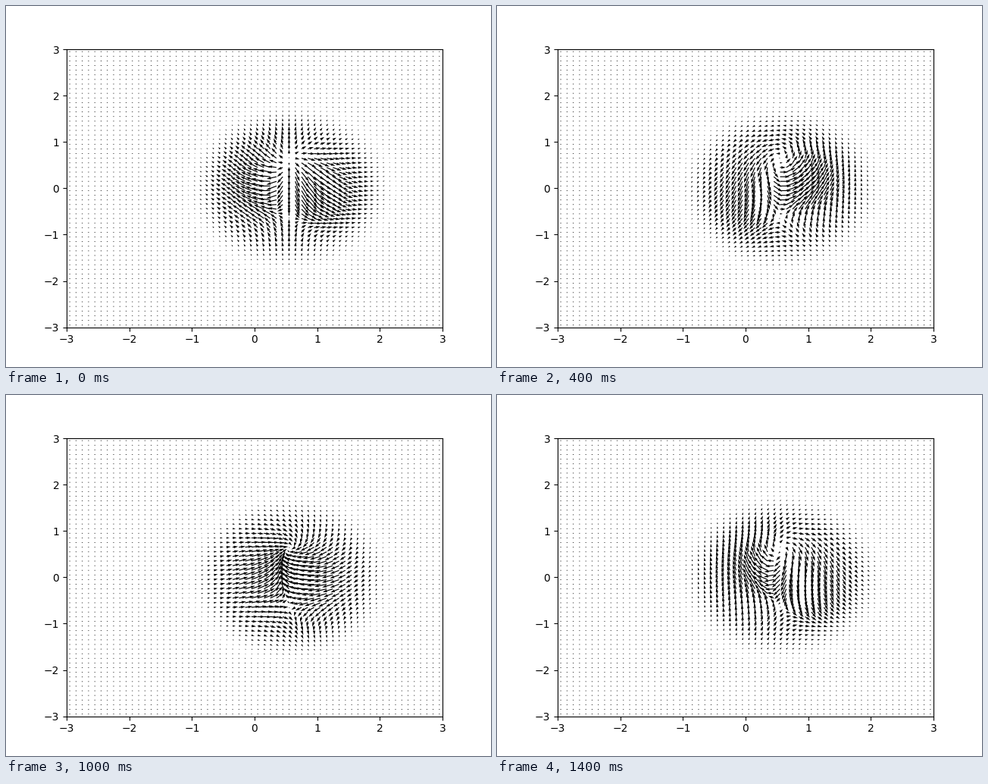
These frames come from a looping animation (640 px wide and 476 px high, 1.6 s). A matplotlib script:

```python
import numpy as np
import matplotlib.pyplot as plt
from matplotlib.animation import FuncAnimation

FRAMES = 8
INTERVAL = 200
PEAK = 36  # envelope height, in pixels of arrow length

axis = np.linspace(-2.95, 2.95, 60)
X, Y = np.meshgrid(axis, axis)


def vortex_pair(x, y):
    """Complex field with two opposite vortices under a soft envelope."""
    u = x - 0.55
    real = (1 - np.exp(-0.7 * u)) / 0.7
    imag = 0.57 * ((x - 1.03) ** 2 + y ** 2 - 0.61)
    field = real + 1j * imag
    envelope = np.exp(-1.15 * (x - 0.6) ** 2 - 0.95 * y ** 2)
    return PEAK * envelope * field / (np.abs(field) + 0.3)


field = vortex_pair(X, Y)

fig, ax = plt.subplots(figsize=(6.4, 4.76), dpi=100)
ax.set_xlim(-3, 3)
ax.set_ylim(-3, 3)
arrows = ax.quiver(X, Y, field.real, field.imag,
                   scale=1, scale_units="dots", width=0.0024)


def update(frame):
    turned = field * np.exp(2j * np.pi * frame / FRAMES)
    arrows.set_UVC(turned.real, turned.imag)
    return (arrows,)


anim = FuncAnimation(fig, update, frames=FRAMES, interval=INTERVAL,
                     repeat=True, repeat_delay=0)
plt.show()
```
